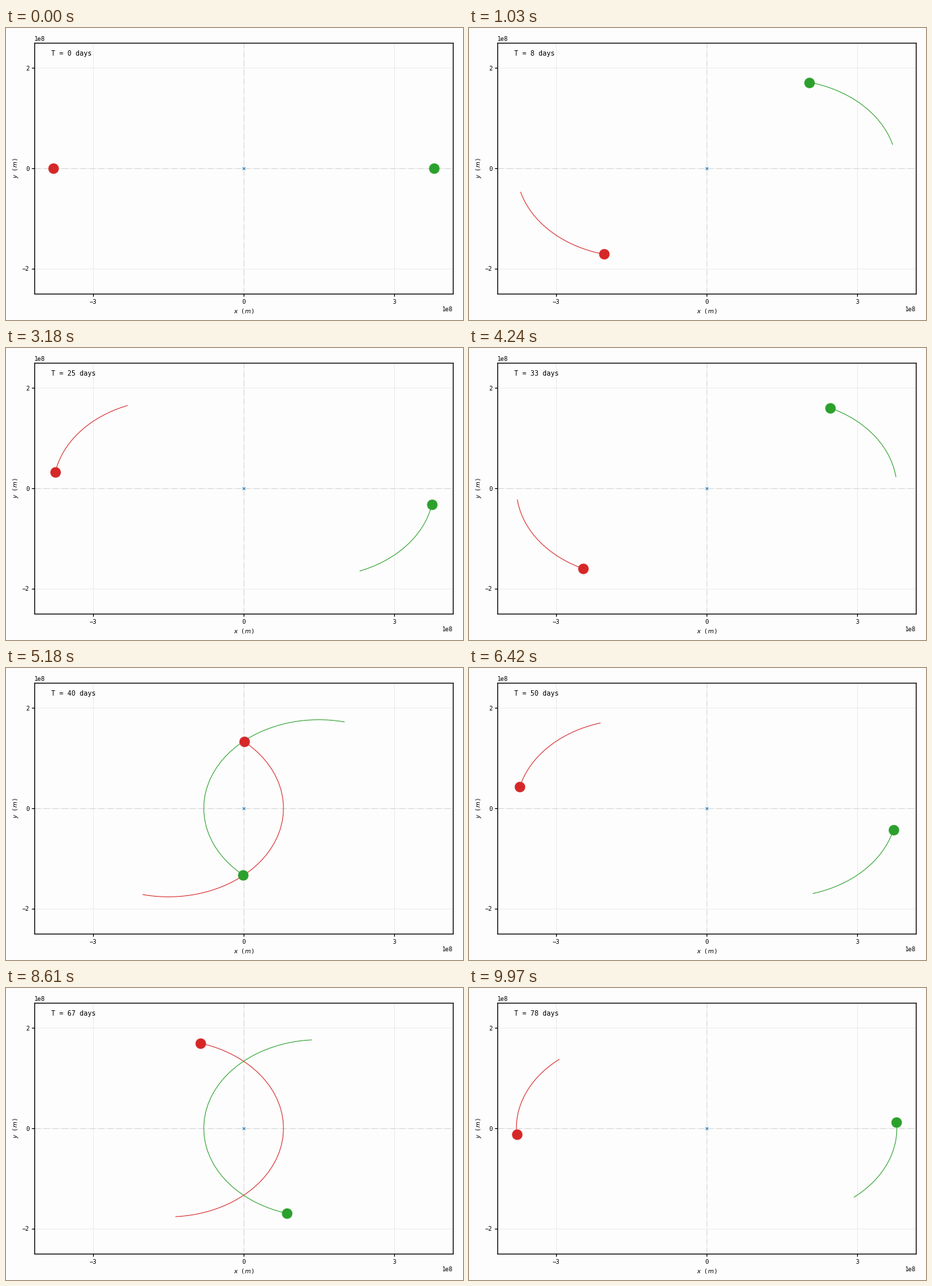
Recreate the animation shown at these times as a matplotlib script. Size 677 by 433 pixels, loop 10 s.

```python
import numpy as np
import matplotlib.pyplot as plt
from matplotlib.animation import FuncAnimation

W, H, DPI = 677, 433, 64
LEFT, RIGHT, TOP, BOTTOM = 42, 662, 22, 394
SCALE = 74.4 / 1e8          # pixels per metre
PAPER = "#fdfdfd"
RED, GREEN, BLUE = "#d62728", "#2ca02c", "#1f77b4"

FRAMES = 330
STEPS = 600                 # simulation steps in one loop
TRAIL = 48                  # steps of path left behind each body
DAYS_PER_STEP = 0.13

# Orbit of the red body, in metres; the green one mirrors it
A, B, CENTRE = 170.45 / SCALE, 131.3 / SCALE, -111.35 / SCALE
ECC = -CENTRE / A
RATE = 0.031662             # mean anomaly per step


def pt(px):
    return px * 72 / DPI


def orbit(steps):
    """Positions for given steps, starting from the far end of the ellipse."""
    mean = RATE * steps
    e = mean.copy()
    for _ in range(60):
        e -= 0.7 * (e + ECC * np.sin(e) - mean) / (1 + ECC * np.cos(e))
    return CENTRE - A * np.cos(e), -B * np.sin(e)


plt.rcParams.update({
    "font.family": "DejaVu Sans Mono",
    "mathtext.fontset": "dejavusans",
    "axes.linewidth": pt(1.3),
})

fig = plt.figure(figsize=(W / DPI, H / DPI), dpi=DPI, facecolor=PAPER)
ax = fig.add_axes([LEFT / W, 1 - BOTTOM / H,
                   (RIGHT - LEFT) / W, (BOTTOM - TOP) / H], facecolor=PAPER)
half_w = (RIGHT - LEFT) / 2 / SCALE
half_h = (BOTTOM - TOP) / 2 / SCALE
ax.set(xlim=(-half_w, half_w), ylim=(-half_h, half_h),
       xticks=[-3e8, 0, 3e8], yticks=[-2e8, 0, 2e8])
ax.set_axisbelow(True)
ax.grid(color="#ebebeb", lw=pt(0.9))
ax.tick_params(labelsize=pt(9), length=pt(4), width=pt(1.2), pad=pt(3.7))
for axis in (ax.xaxis, ax.yaxis):
    axis.get_offset_text().set_fontsize(pt(9))

dashes = dict(color="#d3d3d3", lw=pt(0.9), ls=(0, (10, 5)), zorder=1)
ax.axhline(0, **dashes)
ax.axvline(0, **dashes)

fig.text(352.5 / W, 1 - 422.5 / H, "$x$ ($m$)", size=pt(9),
         ha="center", va="baseline")
fig.text(17 / W, 1 - 207.5 / H, "$y$ ($m$)", size=pt(9), rotation=90,
         rotation_mode="anchor", ha="center", va="baseline")
clock = ax.text(0.04, 0.95, "", transform=ax.transAxes, size=pt(10))

ax.plot(0, 0, "x", color=BLUE, ms=pt(4), mew=pt(1), zorder=3)

bodies = []
for sign, color in ((1, RED), (-1, GREEN)):
    trail, = ax.plot([], [], color=color, lw=pt(1), zorder=4,
                     solid_capstyle="butt")
    dot, = ax.plot([], [], "o", color=color, ms=pt(15), mew=pt(0.6), zorder=5)
    bodies.append((sign, trail, dot))

path_x, path_y = orbit(np.arange(STEPS, dtype=float))


def update(frame):
    # The 60 fps simulation is shown at 33 fps
    step = (20 * frame + 9) // 11
    part = slice(max(0, step - TRAIL), step + 1)
    for sign, trail, dot in bodies:
        x, y = sign * path_x[part], sign * path_y[part]
        trail.set_data(x, y)
        dot.set_data(x[-1:], y[-1:])
    clock.set_text(f"T = {step * DAYS_PER_STEP:.0f} days")
    return []


anim = FuncAnimation(fig, update, frames=FRAMES, interval=10000 / FRAMES,
                     init_func=lambda: update(0), repeat=True, repeat_delay=0)
plt.show()
```
